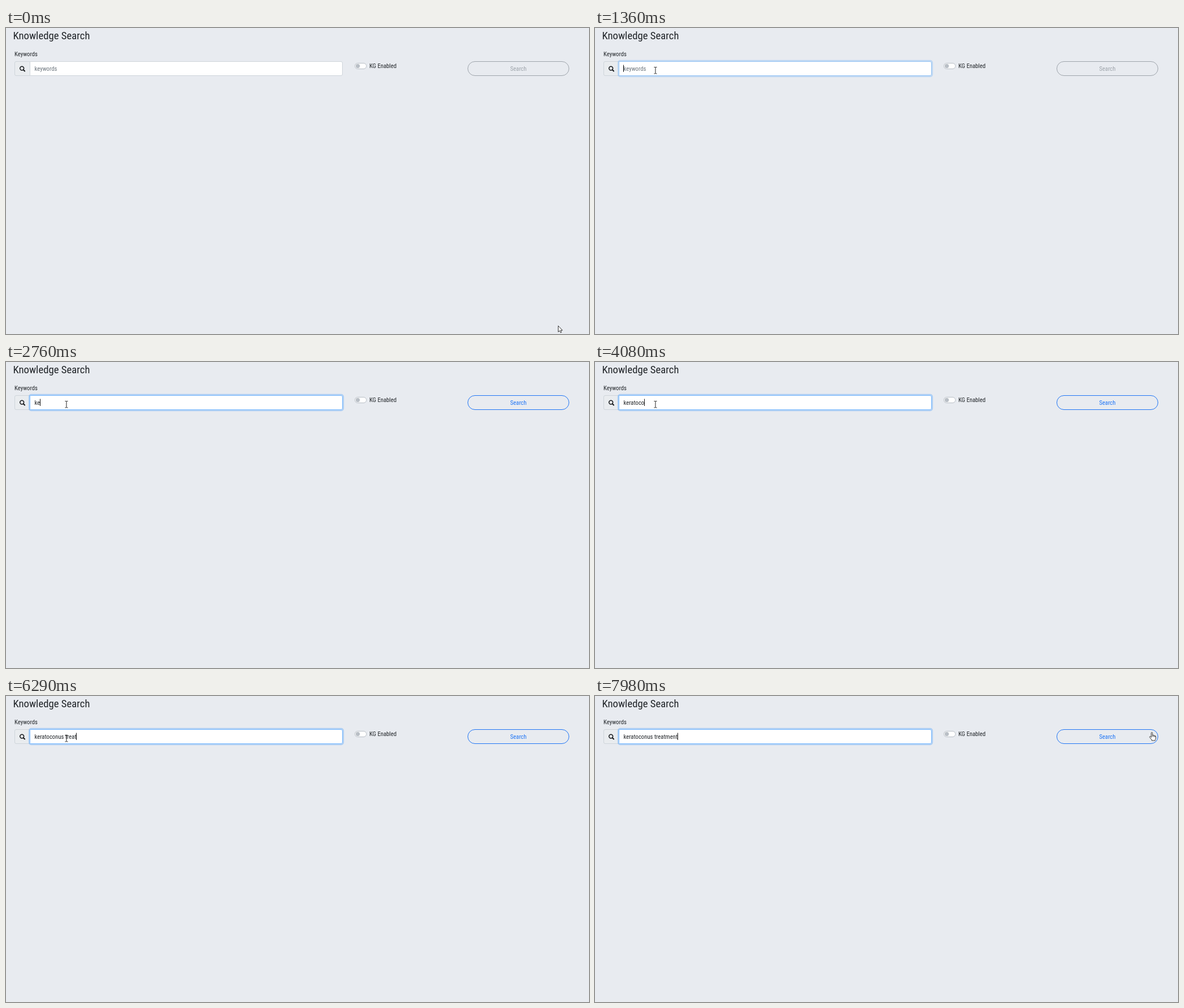
An HTML page that plays this animation: 1032 px wide and 543 px high, repeating every 8000 ms.

```html
<!DOCTYPE html>
<html lang="en">
<head>
<meta charset="utf-8">
<title>Knowledge Search</title>
<style>
html, body { margin: 0; width: 100%; height: 100%; overflow: hidden; background: #e8ebf0; }
svg { display: block; }
text { font: 10.72px "Roboto Condensed", Roboto, sans-serif; font-stretch: 75%; fill: #212529; white-space: pre; }
</style>
</head>
<body>
<svg width="1032" height="543" viewBox="0 0 1032 543">
  <text x="12.4" y="20" style="font-size:18.76px">Knowledge Search</text>
  <text x="15" y="49.5">Keywords</text>

  <path d="M42.5 59.5H18a2.5 2.5 0 0 0-2.5 2.5v20a2.5 2.5 0 0 0 2.5 2.5h24.5z" fill="#e9ecef" stroke="#ced4da"/>
  <g fill="none" stroke="#15181b">
    <circle cx="28.2" cy="71.6" r="3.4" stroke-width="1.6"/>
    <path d="M30.8 74.2l2.3 2.3" stroke-width="2" stroke-linecap="round"/>
  </g>
  <rect id="ring" x="41" y="58" width="556" height="28" rx="3.5" fill="none" stroke="#007bff" stroke-opacity=".25" stroke-width="2.4"/>
  <path id="box" d="M42.5 59.5H593a2.5 2.5 0 0 1 2.5 2.5v20a2.5 2.5 0 0 1-2.5 2.5H42.5z" fill="#fff"/>
  <text id="entry" x="50.5" y="75.5"></text>
  <rect id="caret" y="65.5" width="1" height="12.5" fill="#111"/>

  <rect x="617.5" y="62.5" width="20.5" height="10" rx="5" fill="#fff" stroke="#b9bfc6"/>
  <circle cx="622.7" cy="67.5" r="3.7" fill="#b9bfc6"/>
  <text x="643.2" y="71">KG Enabled</text>

  <rect id="button" x="817.5" y="59.5" width="179" height="25" rx="12.5" fill="none"/>
  <text id="label" x="907" y="75.5" text-anchor="middle">Search</text>

  <path id="arrow" d="M.5.5v10.8l2.5-2.2 1.7 3.6 1.7-.8-1.6-3.5H8z" fill="#fff" stroke="#222" stroke-width=".9"/>
  <path id="beam" d="M-2.5-5.5h2l.5.5.5-.5h2M0-5V5.5M-2.5 6h2l.5-.5.5.5h2" fill="none" stroke="#222"/>
  <path id="hand" d="M3.6 9.5V1.6q0-1.1 1.1-1.1t1.1 1.1V5.5q1.8-.8 2.2.6 1.6-.5 2 .7 1.7-.3 1.7 1.2v3q0 1.5-1.2 2.7V15H4.6v-1.2L1 9.5Q.3 8.2 1.2 7.7t1.6.8zM5.8 5.5v3M8 6.1v2.4M10 6.8v2" fill="#fff" stroke="#222" stroke-width=".9"/>
</svg>
<script>
const $ = id => document.getElementById(id);
const LOOP = 8000, FOCUS = 1285, BLINK = 530;
const phrase = "keratoconus treatment";
const keyTimes = [2620, 2760, 3020, 3150, 3480, 3680, 3880, 4080, 4360, 4560, 4660,
  4760, 5030, 5290, 5890, 6090, 6290, 6490, 6620, 6690, 6750];

const clamp = v => Math.min(1, Math.max(0, v));
const mix = (a, b, p) => a + (b - a) * p;
const blend = (a, b, p) => `rgb(${a.map((v, i) => Math.round(mix(v, b[i], p)))})`;
const ease = p => p * p * (3 - 2 * p);

// The pointer is sampled in steps, as a screen recorder sees it.
function pointer(t) {
  if (t < 820) {
    const p = ease(clamp(Math.floor(t / 68.2) / 12));
    const x = mix(977, 107, p), y = mix(528, 75, p);
    return [y < 85 ? "beam" : "arrow", x, y];
  }
  if (t < 7560) return ["beam", 107, 75];
  const step = Math.floor((t - 7560) / 70) + 1;
  if (step > 6) return ["hand", 981, 64];
  const p = ease(step / 6), x = mix(107, 1000, p), y = mix(75, 39, p);
  return [x < 596 && y > 59 ? "beam" : "arrow", x, y];
}

function draw(t) {
  const typed = keyTimes.filter(k => k <= t).length;
  const entry = $("entry");
  entry.textContent = typed ? phrase.slice(0, typed) : "keywords";
  entry.style.fill = typed ? "#212529" : "#6c757d";

  const focus = clamp((t - FOCUS + 30) / 150);
  $("ring").style.opacity = focus;
  $("box").setAttribute("stroke", blend([206, 212, 218], [128, 189, 255], focus));

  const since = t - (typed ? keyTimes[typed - 1] : FOCUS);
  const on = t >= FOCUS && Math.floor(since / BLINK) % 2 === 0;
  $("caret").style.opacity = on ? 1 : 0;
  const width = typed ? entry.getComputedTextLength() : 0;
  $("caret").setAttribute("x", Math.floor(50.5 + width));

  const active = blend([158, 164, 171], [31, 117, 245], clamp((t - 2600) / 150));
  $("button").setAttribute("stroke", active);
  $("label").style.fill = active;

  const [shape, x, y] = pointer(t);
  for (const id of ["arrow", "beam", "hand"]) $(id).style.display = id === shape ? "" : "none";
  $(shape).setAttribute("transform", `translate(${Math.round(x)} ${Math.round(y)})`);
}

const start = performance.now();
function frame() {
  draw((performance.now() - start) % LOOP);
  requestAnimationFrame(frame);
}
frame();
</script>
</body>
</html>
```
